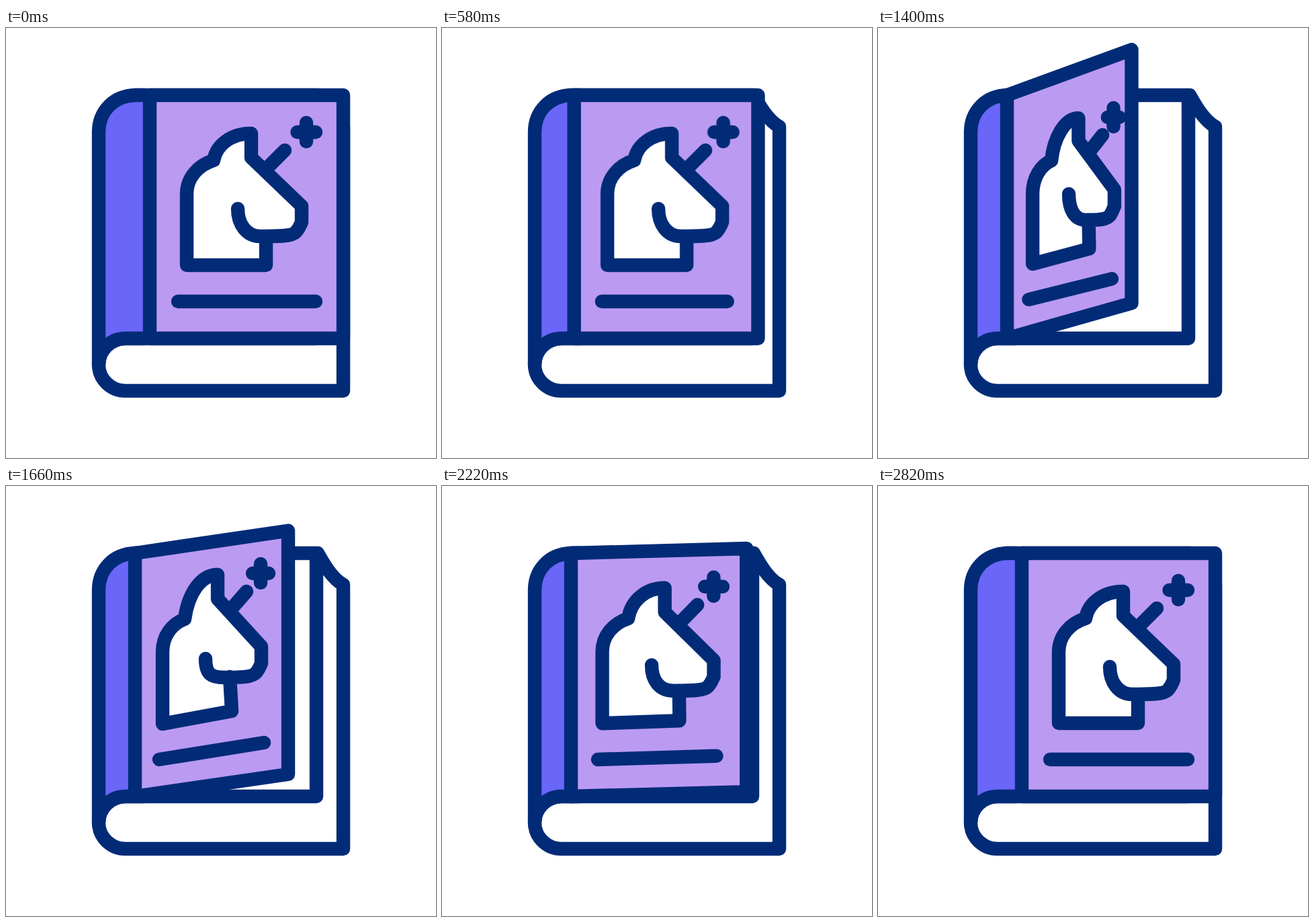
Write an HTML page without scripts that moves like this. It is 640 px wide and 640 px high and loops after 3600 ms.

```html
<!DOCTYPE html>
<html lang="en">
<head>
<meta charset="utf-8">
<title>Storybook</title>
<style>
html, body { margin: 0; width: 100%; height: 100%; overflow: hidden; background: #fff; }
svg { display: block; width: 100vw; height: 100vh; }
path {
  fill: none; stroke: #022b77; stroke-width: 20.4;
  stroke-linecap: round; stroke-linejoin: round;
}
.bend, .slide {
  animation: 3600ms cubic-bezier(.333, 0, .667, 1) infinite;
}
.bend { d: var(--flat); animation-name: bend; }
.slide { animation-name: slide; }

/* shut, slid back, swung wide, half open, slid back, shut */
@keyframes bend {
  0%, 76.11%, 100% { d: var(--shut, var(--flat)); }
  22.92%, 64.72% { d: var(--flat); }
  35.42% { d: var(--wide); }
  45.47%, 54.44% { d: var(--half); }
}
@keyframes slide {
  0%, 76.11%, 100% { transform: translateX(0); }
  22.92%, 64.72% { transform: translateX(var(--dx)); }
}

.spine { fill: #6966f8; }
.cover {
  fill: #bb9af2;
  --shut: path("M214 100L502 100L502 462L214 462Z");
  --flat: path("M192 100L462 100L462 462L192 462Z");
  --wide: path("M192 100L361 19L361 402L192 462Z");
  --half: path("M192 100L420 66.5L420 429L192 462Z");
}
.bar {
  --shut: path("M256 407L461 407");
  --flat: path("M233 407L415 407");
  --wide: path("M223 403L334 370");
  --half: path("M228 407L384 382");
}
.head {
  fill: #fff;
  --flat: path("M387 310L387 353L269 353L269 247C269 223 286 204 309 197C313 174 335 157 365 157L365 193L440 265L440 289C438 293 436 299 431 304C425 310 408 310 378 310C358 310 345 292 345 269");
  --wide: path("M335 286L335 326L258 350L258 247C258 223 269 204 284 197C287 165 302 135 321 135L321 168L370 241L370 266C368 270 367 274 364 279C359 286 349 286 332 286C318 286 308 268 308 243");
  --half: path("M362 284L365 335L262 354L262 247C262 223 276 205 295 198C300 160 319 132 344 132L344 168L409 239L409 264C407 269 405 273 402 277C396 285 379 285 354 285C334 285 326 280 326 257");
}
.horn {
  --flat: path("M390 207L415 182");
  --wide: path("M335 185L354 160");
  --half: path("M367 180L387 157");
}
.star {
  --flat: path("M433.5 155L461 155M447 141L447 169");
  --wide: path("M368 134L383 134M375.5 120L375.5 148");
  --half: path("M403 130L427 130M415 116L415 144");
}
</style>
</head>
<body>
<svg viewBox="0 0 640 640">
  <path d="M190 100H464C474 118 486 138 502 147V540H178A40 39 0 0 1 178 462H462V100"/>
  <path class="spine" d="M206 100H192C160 101 138 124 138 155V501A40 39 0 0 1 178 462H206"/>
  <path class="cover bend"/>
  <path class="bar bend"/>
  <g class="slide" style="--dx:-29px">
    <path class="horn bend"/>
    <path class="head bend"/>
  </g>
  <g class="slide" style="--dx:-36px">
    <path class="star bend"/>
  </g>
</svg>
</body>
</html>
```
